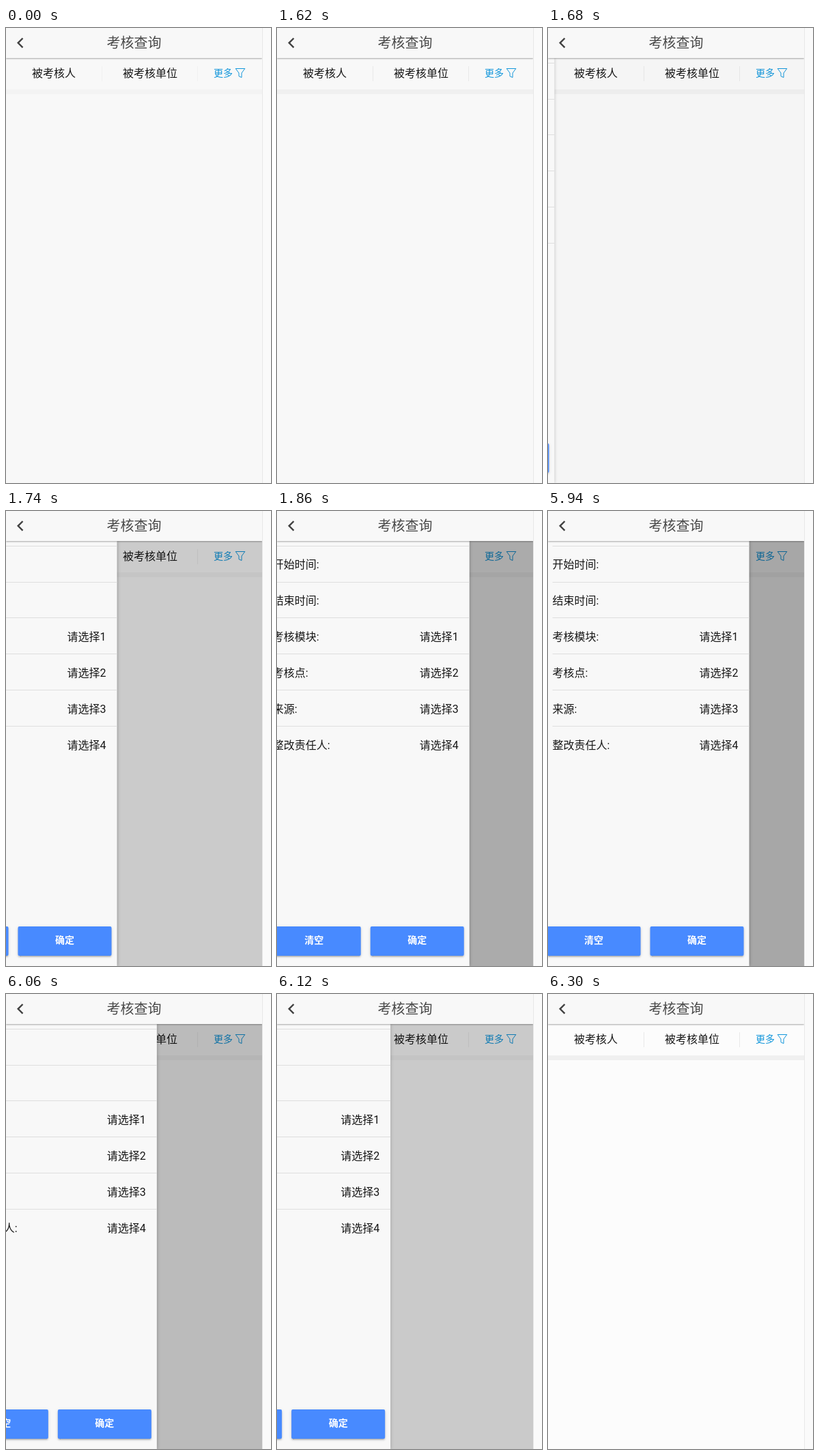
An HTML page that plays this animation: 388x667 px, repeating every 7.74 s.

```html
<!DOCTYPE html>
<html lang="zh-CN">
<head>
<meta charset="utf-8">
<style>
  html, body { margin: 0; width: 100%; height: 100%; overflow: hidden; background: #fafafa; }
  body { position: relative; font: 16px/24px Roboto, "Noto Sans CJK SC", "Noto Sans CJK", sans-serif; color: #161616; }
  div, span, svg { position: absolute; white-space: nowrap; }
  #phone { left: 0; top: 0; width: 375px; height: 667px; overflow: hidden; background: #f8f8f8; }
  #phone.bright { background: #fcfcfc; }
  #edge { left: 375px; top: 0; width: 1px; height: 667px; background: #e8e8e8; }
  #header { left: 0; top: 0; width: 375px; height: 44px; background: #f8f8f8; box-shadow: 0 1px 2px rgba(0,0,0,.34); }
  #header span { left: 147.5px; top: 10px; font-size: 20px; color: #484848; }
  .tab { top: 55px; }
  .more { left: 304px; top: 54px; font-size: 14px; color: #1296db; }
  .split { top: 56px; width: 1px; height: 22px; background: #e9e9e9; }
  .band { left: 0; top: 90px; width: 375px; height: 7px; background: #f0f0f0; }
  .pale .split { background: #f1f1f1; }
  .pale .band { background: #f3f3f3; }
  #shade { left: 0; top: 0; width: 375px; height: 667px; background: #000; opacity: 0; }
  #menu { left: 0; top: 44px; width: 304px; height: 623px; background: #f8f8f8; visibility: hidden; box-shadow: 0 0 5px rgba(0,0,0,.35); }
  .line { left: 16px; width: 288px; height: 1px; background: #dedede; }
  .label { left: 16px; }
  .value { right: 16px; }
  .button { top: 565px; width: 137px; height: 43px; border-radius: 2px; background: #488aff; color: #fff;
    font-size: 14px; font-weight: 600; line-height: 40px; text-align: center;
    box-shadow: 0 2px 2px rgba(0,0,0,.14), 0 3px 1px -2px rgba(0,0,0,.2), 0 1px 5px rgba(0,0,0,.12); }
</style>
</head>
<body>
<div id="phone">
  <span class="tab" style="left:38px">被考核人</span>
  <span class="tab" style="left:171px">被考核单位</span>
  <span class="more">更多</span>
  <svg style="left:335px;top:58px" width="17" height="17" fill="none" stroke="#1296db" stroke-linejoin="round">
    <path d="M1.2 1.5H14.8L10 8V14.5L6 12.7V8Z"/>
  </svg>
  <div class="split" style="left:140px"></div>
  <div class="split" style="left:280px"></div>
  <div class="band"></div>
  <div id="shade"></div>
  <div id="menu">
    <div class="button" style="left:8px">清空</div>
    <div class="button" style="left:159px">确定</div>
  </div>
  <div id="header">
    <svg style="left:0;top:0" width="40" height="44" fill="none" stroke="#424242" stroke-width="2.4">
      <path d="M24.5 15L17.7 21.8L24.5 28.6"/>
    </svg>
    <span>考核查询</span>
  </div>
</div>
<div id="edge"></div>
<script>
const LOOP = 7740, STEP = 60, WIDTH = 304;
const phone = document.getElementById('phone');
const menu = document.getElementById('menu');
const shade = document.getElementById('shade');

const rows = [['开始时间:'], ['结束时间:'], ['考核模块:', '请选择1'],
  ['考核点:', '请选择2'], ['来源:', '请选择3'], ['整改责任人:', '请选择4']];

function add(cls, top, text = '') {
  const el = document.createElement('div');
  el.className = cls;
  el.style.top = Math.round(top) + 'px';
  el.textContent = text;
  menu.append(el);
}

rows.forEach(([label, value], i) => {
  const y = 23.2 + i * 52.9;
  add('line', 6.9 + i * 52.75);
  add('label', y, label);
  if (value) add('value', y, value);
});

// Cubic bezier easing with control points (x1, y1) and (x2, 1)
function ease(x, x1, y1, x2) {
  if (x <= 0) return 0;
  if (x >= 1) return 1;
  const at = (s, a, b) => 3 * (1 - s) ** 2 * s * a + 3 * (1 - s) * s * s * b + s ** 3;
  let lo = 0, hi = 1;
  for (let i = 0; i < 30; i++) {
    const mid = (lo + hi) / 2;
    if (at(mid, x1, x2) < x) lo = mid; else hi = mid;
  }
  return at(lo, y1, 1);
}

const start = performance.now();

function draw() {
  const now = (performance.now() - start) % LOOP;
  const t = Math.floor(now / STEP) * STEP;
  const open = t < 5940
    ? ease((t - 1678) / 280, 0, 0, .2)
    : 1 - ease((t - 5888) / 402, .4, 0, .9);
  menu.style.visibility = open > 0 ? 'visible' : 'hidden';
  menu.style.transform = `translateX(${(open - 1) * WIDTH}px)`;
  shade.style.opacity = open * .34;
  phone.classList.toggle('pale', t < 1620);
  phone.classList.toggle('bright', t >= 6300);
  requestAnimationFrame(draw);
}
draw();
</script>
</body>
</html>
```
